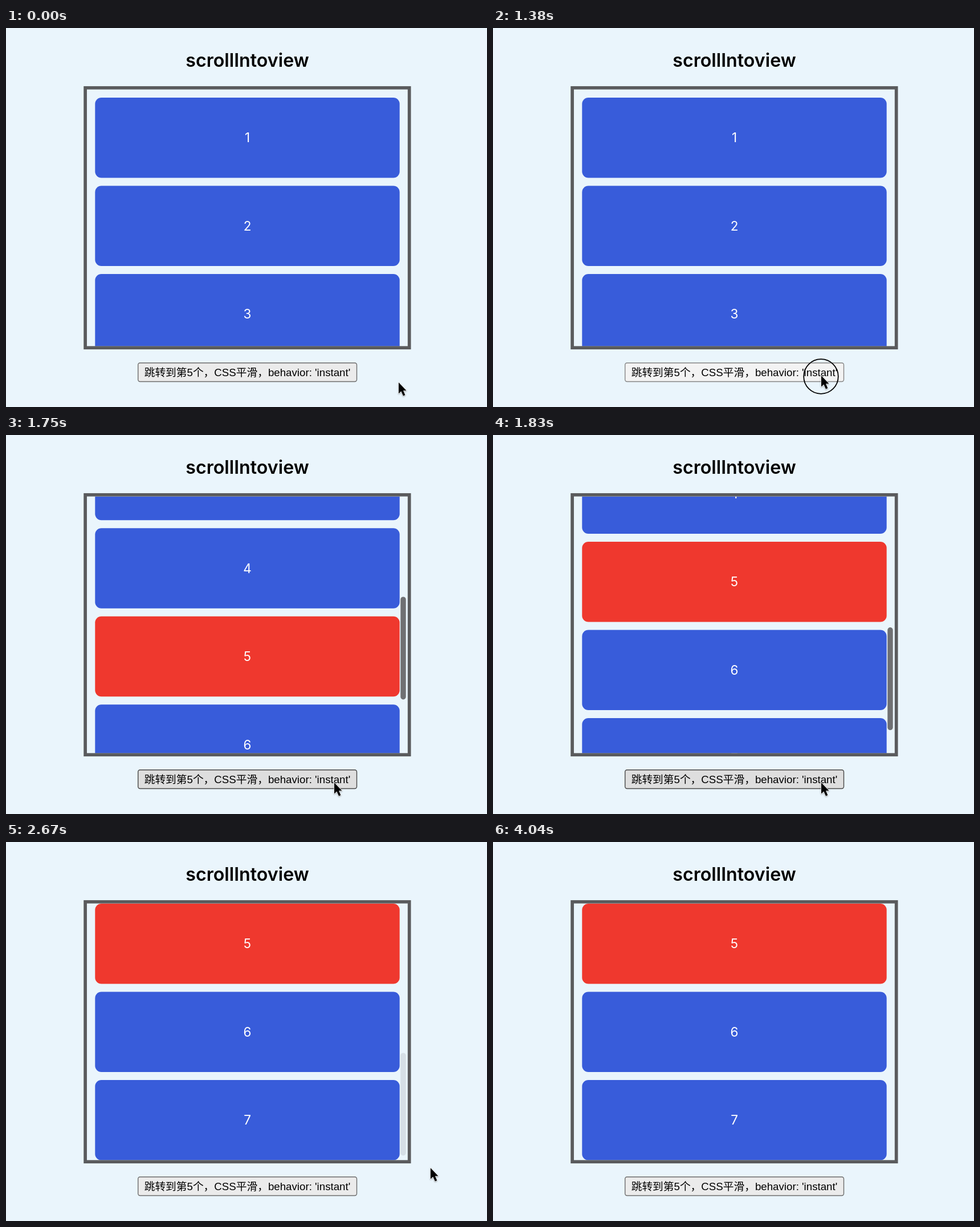
Animation of 844 by 664 pixels, one loop 4080 ms. Source, as an HTML page:

```html
<!DOCTYPE html>
<html lang="zh-CN">
<head>
<meta charset="utf-8">
<title>scrollIntoview</title>
<style>
  html, body { margin: 0; width: 100%; height: 100%; overflow: hidden; background: #eaf5fc; }
  svg { display: block; }
  text { text-anchor: middle; }
  .title { font: 600 32.2px Inter, sans-serif; }
  .item text { font: 22.5px Inter, sans-serif; fill: #fff; }
  .label { font: 18.72px "Liberation Sans", "Noto Sans CJK SC", "Noto Sans CJK", sans-serif; }
</style>
</head>
<body>
<svg width="844" height="664" viewBox="0 0 844 664">
  <clipPath id="view"><rect x="142" y="108" width="563" height="449.5"/></clipPath>
  <text class="title" x="423.5" y="68">scrollIntoview</text>
  <g clip-path="url(#view)">
    <g id="list"></g>
    <rect id="thumb" x="692.3" width="9.4" height="180" rx="4.7" fill="#6f7073"/>
  </g>
  <rect x="139.1" y="104.8" width="568.6" height="455.4" fill="none" stroke="#5a5b5d" stroke-width="5.7"/>
  <rect id="button" x="231.7" y="586.7" width="383.8" height="32.8" rx="3.5" stroke-width="1.4"/>
  <text class="label" x="423.5" y="610">跳转到第5个，CSS平滑，behavior: 'instant'</text>
  <circle id="ring" cx="575.5" cy="610.5" r="30.3" fill="none" stroke="#000" stroke-width="1.8"/>
  <g id="cursor" stroke-linejoin="round">
    <path id="arrow" d="M0 0V19.5L4.4 15.4L8 23.4L11.4 21.9L8 14.2H13.6Z" stroke="#fff" stroke-width="1.4"
      style="paint-order:stroke; filter:drop-shadow(0 1.5px 1px #0005)"/>
  </g>
</svg>
<script>
const FPS = 24, FRAMES = 98, DISTANCE = 632;
const $ = id => document.getElementById(id);
const [list, thumb, button, ring, cursor] = ['list', 'thumb', 'button', 'ring', 'cursor'].map($);

// keys: [time, value, ...]
const scrollKeys = [[1458, 0], [1583, .207], [1750, .614], [1917, .9445], [1958, 1]];
const cursorKeys = [
  [0, 689, 621], [250, 688, 621], [540, 679, 622], [800, 632, 619], [1000, 596, 613], [1250, 576, 609],
  [2208, 576, 609], [2300, 597, 607], [2450, 660, 595], [2580, 718, 582], [2667, 745, 571],
  [2708, 753, 562], [2917, 766, 541], [3250, 772, 487], [3333, 779, 410], [3500, 800, 165], [3542, 811, 131]
];

list.innerHTML = [1, 2, 3, 4, 5, 6, 7].map(n => `
  <g class="item" transform="translate(0 ${122 + (n - 1) * 154.5})">
    <rect x="156.3" width="534.4" height="140.4" rx="11" fill="${n === 5 ? '#ef382e' : '#385cda'}"/>
    <text x="423.5" y="78.3">${n}</text>
  </g>`).join('');

const clamp = v => Math.min(1, Math.max(0, v));
const smooth = v => v * v * (3 - 2 * v);

function at(keys, t) {
  const i = keys.findIndex(k => k[0] > t);
  if (i < 0) return keys.at(-1).slice(1);
  if (i === 0) return keys[0].slice(1);
  const a = keys[i - 1], b = keys[i], p = (t - a[0]) / (b[0] - a[0]);
  return a.slice(1).map((v, j) => v + (b[j + 1] - v) * p);
}

function draw(t) {
  const scroll = DISTANCE * smooth(at(scrollKeys, t)[0]);
  list.setAttribute('transform', `translate(0 ${-scroll})`);
  thumb.setAttribute('y', 110.3 + scroll * .41);
  thumb.setAttribute('opacity', t > 1470 ? clamp((2708 - t) / 250) : 0);

  const [x, y] = at(cursorKeys, t);
  cursor.setAttribute('transform', `translate(${x} ${y})`);
  cursor.setAttribute('visibility', t < 3570 ? 'visible' : 'hidden');

  const pressed = t > 1300 && t < 1450;
  const hover = x > 231 && x < 616 && y > 586 && y < 620;
  const [fill, stroke] = pressed ? ['#f3f3f3', '#858585'] : hover ? ['#dedede', '#484848'] : ['#ebebeb', '#6c6c6c'];
  button.setAttribute('fill', fill);
  button.setAttribute('stroke', stroke);
  ring.setAttribute('visibility', pressed ? 'visible' : 'hidden');
}

const start = performance.now();
function tick() {
  const ms = (performance.now() - start) % 4080;
  const frame = Math.min(FRAMES - 1, Math.floor((ms + 5) * FPS / 1000));
  draw(frame * 1000 / FPS);
  requestAnimationFrame(tick);
}
tick();
</script>
</body>
</html>
```
